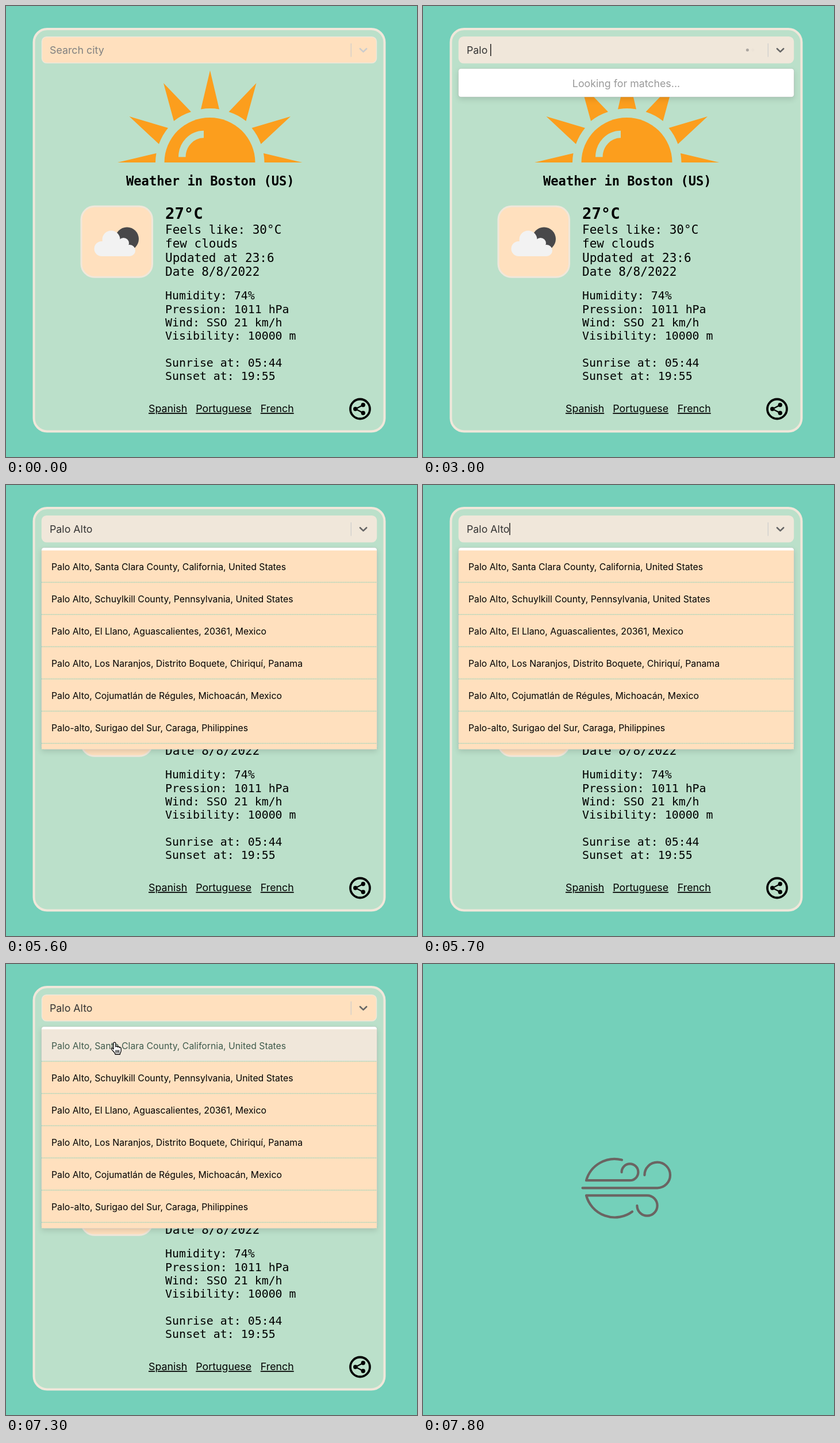
These frames come from a looping animation (715x784 px, 8 s). An HTML page:

```html
<!DOCTYPE html>
<html lang="en">
<head>
<meta charset="utf-8">
<title>Weather search</title>
<style>
  html, body { margin: 0; width: 100%; height: 100%; overflow: hidden; background: #74d0ba; }
  svg { display: block; }
  text { white-space: pre; }
  .ui { font: 17.8px Inter, sans-serif; }
  .mono { font-family: "DejaVu Sans Mono", monospace; }
  .bold { font-weight: bold; }
  .link { text-decoration: underline; }
  #options { font-size: 15.8px; }
  #menu { filter: drop-shadow(0 4px 5px rgba(0, 0, 0, .12)); }
</style>
</head>
<body>
<svg width="715" height="784" viewBox="0 0 715 784">
  <g id="page">
    <rect x="48.5" y="40" width="610" height="699.5" rx="23" fill="#bbe0ca" stroke="#f0e7da" stroke-width="4"/>

    <g fill="#fc9e1d">
      <path d="M355 112L339 179.5A93.5 93.5 0 0 1 371 179.5Z"/>
      <g id="rays">
        <path d="M274 134L292 200A93.5 93.5 0 0 1 322 184Z"/>
        <path d="M214.5 192L266 240A93.5 93.5 0 0 1 282 212Z"/>
        <path d="M194 272H260A93.5 93.5 0 0 1 261.5 256Z"/>
      </g>
      <use href="#rays" transform="matrix(-1 0 0 1 709.5 0)"/>
      <path d="M275.5 272A79 78 0 0 1 433.5 272Z"/>
    </g>
    <path d="M306.3 262.5A37.7 39.5 0 0 1 344 223" fill="none" stroke="#bbe0ca" stroke-width="12.5"/>

    <rect x="131" y="348.3" width="123.5" height="123" rx="23" fill="#ffe0be" stroke="#f0e7da" stroke-width="3"/>
    <circle cx="210.5" cy="405" r="20.5" fill="#48484a"/>
    <g fill="#f2f2f2">
      <circle cx="166.5" cy="422" r="13"/>
      <circle cx="183" cy="406" r="15.5"/>
      <circle cx="204.5" cy="412.5" r="9.5"/>
      <circle cx="215" cy="425" r="10"/>
      <path d="M166 409H205L215 435H166Z"/>
    </g>

    <g id="report" class="mono">
      <text class="bold" x="209" y="312" font-size="22.1">Weather in Boston (US)</text>
      <text class="bold" x="277" y="370" font-size="27.3">27°C</text>
    </g>

    <g class="ui">
      <text class="link" x="248" y="706.3">Spanish</text>
      <text class="link" x="330.3" y="706.3">Portuguese</text>
      <text class="link" x="442.8" y="706.3">French</text>
    </g>
    <circle cx="616" cy="700.5" r="17" fill="none" stroke="#000" stroke-width="3.8"/>
    <path d="M621.5 693.5L608 700.5L621.5 707.5" fill="none" stroke="#000" stroke-width="2.4"/>
    <circle cx="621.3" cy="693.5" r="3.7"/>
    <circle cx="621.3" cy="707.5" r="3.7"/>
    <circle cx="607.8" cy="700.5" r="3.7"/>

    <rect id="control" x="62.5" y="53.7" width="582" height="45.3" rx="8" stroke="#f0e7da" stroke-width="1.5"/>
    <g class="ui">
      <text id="placeholder" x="76" y="83.3" fill="#808080">Search city</text>
      <text id="query" x="76" y="83.3" fill="#333"></text>
    </g>
    <path id="caret" d="M.5 66V87" stroke="#000" stroke-width="1.3"/>
    <g id="dots" fill="#666">
      <circle cx="564.4" cy="76.5" r="2.5"/>
      <circle cx="573.9" cy="76.5" r="2.5"/>
      <circle cx="583.4" cy="76.5" r="2.5"/>
    </g>
    <path d="M600.3 65V88.5" stroke="#ccc" stroke-width="1.2"/>
    <path id="chevron" d="M616 74.2L621.6 79.6L627.2 74.2" fill="none" stroke-width="2.6" stroke-linecap="round" stroke-linejoin="round"/>

    <g id="menu" class="ui">
      <rect id="sheet" x="61.5" y="108.8" width="584" rx="4.5" fill="#fff" stroke="#000" stroke-opacity=".12"/>
      <text id="searching" x="353.5" y="140.5" text-anchor="middle" fill="#999">Looking for matches...</text>
      <g id="options">
        <path d="M62 113.7H645V459.3H62Z" fill="#ffe0be"/>
        <path id="hover" d="M62 113.7H645V169H62Z" fill="#f0e7da"/>
      </g>
    </g>
  </g>

  <g id="loader" fill="none" stroke="#6b6462" stroke-width="4.2" stroke-linecap="round" stroke-linejoin="round">
    <path d="M346 340.5A51.3 51.3 0 0 0 284 376.2H360A14.4 14.4 0 1 0 345.6 362"/>
    <path d="M277.5 389.3H408A22.3 22.3 0 1 0 385.4 367"/>
    <path d="M364 430.5A51.3 51.3 0 0 1 284 402.4H390A17.6 17.6 0 1 1 372.4 420"/>
  </g>

  <circle id="ring" r="35.5" fill="none" stroke="#000" stroke-width="1.7"/>
  <g id="cursor">
    <g id="hand" stroke="#000" stroke-width="1.3" stroke-linejoin="round" stroke-linecap="round">
      <path fill="#fff" d="M5 13V3C5 .5 8.8 .5 8.8 3V9C9 7.4 12 7.4 12 9.5C12.3 8 15 8 15.2 10.5C15.6 9.2 18.2 9.6 18.2 12V16C18 18.5 16.3 19 16.3 22H8C8 19 3.2 16 1.5 13C.5 11 3 10.3 5 13Z"/>
      <path d="M9.3 15V19M11.8 15V19M14.3 15V19"/>
    </g>
    <path id="arrow" stroke="#fff" stroke-width="1.2" d="M5 1V17L8.7 13.6L11.2 19.3L13.7 18.2L11.3 12.6H16.3Z"/>
  </g>
</svg>
<script>
const LOOP = 8000, STEP = 100;
const $ = id => document.getElementById(id);
const show = (id, visible) => { $(id).style.display = visible ? '' : 'none'; };
const smooth = x => { x = Math.min(1, Math.max(0, x)); return x * x * (3 - 2 * x); };

function add(parent, tag, attrs, text = '') {
  const el = document.createElementNS('http://www.w3.org/2000/svg', tag);
  for (const key in attrs) el.setAttribute(key, attrs[key]);
  el.textContent = text;
  return parent.appendChild(el);
}

const addLines = (lines, y, step, size) => lines.forEach((line, i) =>
  add($('report'), 'text', { x: 277, y: y + i * step, 'font-size': size }, line));
addLines(['Feels like: 30°C', 'few clouds', 'Updated at 23:6', 'Date 8/8/2022'], 395.8, 24.55, 21);
addLines(['Humidity: 74%', 'Pression: 1011 hPa', 'Wind: SSO 21 km/h', 'Visibility: 10000 m', '',
  'Sunrise at: 05:44', 'Sunset at: 19:55'], 510.3, 23.35, 19.9);

const options = [
  'Palo Alto, Santa Clara County, California, United States',
  'Palo Alto, Schuylkill County, Pennsylvania, United States',
  'Palo Alto, El Llano, Aguascalientes, 20361, Mexico',
  'Palo Alto, Los Naranjos, Distrito Boquete, Chiriquí, Panama',
  'Palo Alto, Cojumatlán de Régules, Michoacán, Mexico',
  'Palo-alto, Surigao del Sur, Caraga, Philippines'
].map((place, i) => {
  add($('options'), 'path', { d: `M62 ${169.2 + 56 * i}H645`, stroke: '#74d0ba', 'stroke-width': 1.2, 'stroke-dasharray': '1.2 1.2' });
  return add($('options'), 'text', { x: 79, y: 147.7 + 56 * i }, place);
});

const query = 'Palo Alto';
const keyTimes = [1800, 2000, 2300, 2500, 2800, 3200, 3300, 3500, 3700];

// Top left corner of the pointer
function pointerAt(t) {
  const second = t >= 6000;
  const [x0, y0, x1, y1] = second ? [149, 72, 182, 135] : [476, 683, 149, 72];
  const k = second ? smooth((t - 6000) / 900) : smooth((t - 200) / 700);
  return [x0 + (x1 - x0) * k, y0 + (y1 - y0) * k];
}

// Each dot pulses once a second, fading in and out over 800 ms
function dotOpacity(elapsed) {
  if (elapsed < 0) return 1;
  const p = elapsed % 1000;
  return smooth(p < 400 ? p / 400 : (800 - p) / 400);
}

function draw(t) {
  const typing = t >= 1800, found = t >= 5400;
  const [x, y] = pointerAt(t);

  show('page', t < 7400);
  show('loader', t >= 7700);

  const inControl = t >= 300 && y < 95;
  $('control').setAttribute('fill', inControl ? '#f0e7da' : '#ffe0be');
  $('chevron').setAttribute('stroke', t < 1300 ? '#ccc' : t < 1400 ? '#b8b8b8' : '#666');

  show('placeholder', !typing);
  $('query').textContent = query.slice(0, keyTimes.filter(k => k <= t).length);
  const blinkOn = t < 3700 || Math.floor((t - 3700) / 500) % 2 === 0;
  show('caret', t >= 1300 && blinkOn);
  const textEnd = 76 + (typing && t < 7400 ? $('query').getComputedTextLength() : 0);
  $('caret').setAttribute('transform', `translate(${textEnd} 0)`);

  show('dots', typing && !found);
  [...$('dots').children].forEach((dot, i) => dot.setAttribute('opacity', dotOpacity(t - 1800 - 160 * i)));

  show('menu', typing);
  show('searching', !found);
  show('options', found);
  $('sheet').setAttribute('height', found ? 350.6 : 49.4);
  const onOption = t >= 6100 && y > 112;
  show('hover', onOption);
  options[0].setAttribute('fill', onOption ? '#3f5b4c' : '#000');

  show('cursor', (t >= 100 && t < 1800) || (t >= 6100 && t < 7700));
  $('cursor').setAttribute('transform', `translate(${x} ${y})`);
  const clickable = inControl || onOption || y > 675;
  show('hand', clickable);
  show('arrow', !clickable);

  show('ring', t === 1300 || t === 7200);
  $('ring').setAttribute('transform', `translate(${x + 7} ${y + 2.5})`);
}

const start = performance.now();
function tick() {
  const t = (performance.now() - start) % LOOP;
  draw(Math.floor(t / STEP) * STEP);
  requestAnimationFrame(tick);
}
tick();
</script>
</body>
</html>
```
